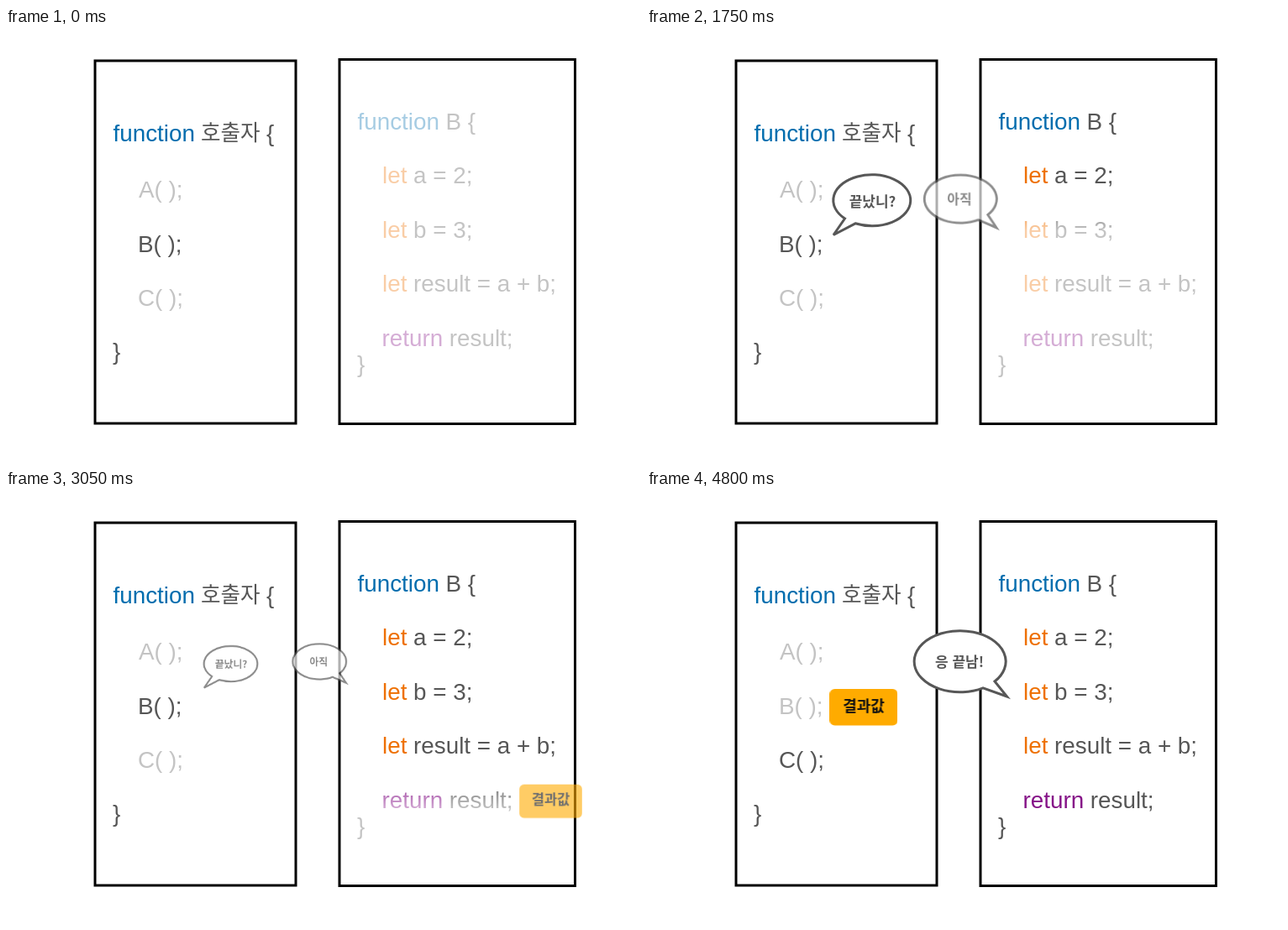
Animation, 756 px wide and 517 px high, one loop 4960 ms. Source, as an HTML page:

```html
<!DOCTYPE html>
<html lang="ko">
<head>
<meta charset="utf-8">
<title>Blocking call</title>
<style>
  html, body { margin: 0; width: 100%; height: 100%; overflow: hidden; background: #fff; }
  svg { position: absolute; left: 0; top: 0; width: 756px; height: 517px; }

  @property --y { syntax: "<length>"; inherits: false; initial-value: 32px; }

  svg, .anim { animation: 4960ms linear infinite; }

  .frame { fill: none; stroke: #000; stroke-width: 3; }
  text { font: 27.8px "Liberation Sans", Arial, sans-serif; fill: #565656; white-space: pre; }
  .ko { font: 25.6px "Noto Sans CJK KR", "Noto Sans CJK", sans-serif; }
  .fn { fill: #006dae; }
  .let { fill: #ee7000; }
  .ret { fill: #861488; }
  .dim { opacity: .35; }

  .bubble path { fill: #fff; stroke: #575757; stroke-width: 3; stroke-linejoin: miter; }
  .bubble text, .value text {
    font: bold 17px "Noto Sans CJK KR", "Noto Sans CJK", sans-serif;
    text-anchor: middle;
  }
  .value text { font-size: 18px; fill: #111; }
  .value rect { fill: #ffab00; }
  .value .ring { fill: none; stroke: #ffab00; stroke-linejoin: round; animation-name: ring; }

  #body {
    -webkit-mask-image: linear-gradient(#000 calc(var(--y) - 22px), rgba(0, 0, 0, .35) calc(var(--y) + 22px));
    mask-image: linear-gradient(#000 calc(var(--y) - 22px), rgba(0, 0, 0, .35) calc(var(--y) + 22px));
    animation-name: wipe;
  }
  #callB { animation-name: dim; }
  #callC { animation-name: light; }
  #ask { transform-origin: 267px 211px; animation-name: ask; }
  #notYet { transform-origin: 373px 206.5px; animation-name: notYet; }
  #done { transform-origin: 373px 206.5px; animation-name: done; }
  #value { transform-origin: 648.5px 370.5px; animation-name: value; }

  @keyframes wipe { from { --y: 31.6px; } to { --y: 563.3px; } }
  @keyframes dim { 0%, 88.1% { opacity: 1; } 93.75%, 100% { opacity: .35; } }
  @keyframes light { 0%, 88.1% { opacity: .35; } 93.75%, 100% { opacity: 1; } }

  /* Bubbles fade in from 80% and leave with a short swell before shrinking. */
  @keyframes ask {
    0%, 8.06%, 26.21%, 44.36%, 62.51%, 66.03%, 85.7%, 100% { opacity: 0; transform: scale(.8); }
    13.1%, 31.25%, 49.4%, 71.07% { opacity: 1; transform: scale(1); }
    21.17%, 39.31%, 57.46%, 80.65% {
      opacity: 1; transform: scale(1);
      animation-timing-function: cubic-bezier(.36, 0, .66, -.56);
    }
    26.2%, 44.35%, 62.5%, 85.69% { opacity: 0; transform: scale(0); }
  }
  @keyframes notYet {
    0%, 13.71%, 26.21%, 31.85%, 44.36%, 50.2%, 62.51%, 100% { opacity: 0; transform: scale(.8); }
    18.75%, 36.9%, 55.24% { opacity: 1; transform: scale(1); }
    21.17%, 39.31%, 57.46% {
      opacity: 1; transform: scale(1);
      animation-timing-function: cubic-bezier(.36, 0, .66, -.56);
    }
    26.2%, 44.35%, 62.5% { opacity: 0; transform: scale(0); }
  }
  @keyframes done {
    0%, 71.57% { opacity: 0; transform: scale(.8); }
    76.6%, 100% { opacity: 1; transform: scale(1); }
  }
  @keyframes value {
    0%, 58.47% { opacity: 0; transform: translate(0, 0) scale(.8); }
    63.5% { opacity: 1; transform: translate(0, 0) scale(1); }
    71.37% {
      opacity: 1; transform: translate(0, 0) scale(1);
      animation-timing-function: cubic-bezier(.37, 0, .63, 1);
    }
    79.44%, 100% { opacity: 1; transform: translate(-390.5px, -112px) scale(1); }
  }
  @keyframes ring {
    0%, 63.5% { stroke-width: 0; opacity: .5; }
    69.5%, 100% { stroke-width: 28px; opacity: 0; }
  }
</style>
</head>
<body>
<svg viewBox="0 0 756 517">
  <rect class="frame" x="106" y="39" width="239" height="432"/>
  <rect class="frame" x="397" y="37.5" width="280.5" height="434"/>
  <text class="fn" x="127.5" y="135">function</text>
  <text class="ko" x="232" y="134">호출자</text>
  <text x="310" y="135">{</text>
  <text class="dim" x="158" y="202">A( );</text>
  <text class="anim" id="callB" x="157" y="266.5">B( );</text>
  <text class="anim" id="callC" x="157" y="331">C( );</text>
  <text x="127" y="395">}</text>
</svg>

<svg id="body" viewBox="0 0 756 517">
  <text x="418.5" y="120.5"><tspan class="fn">function</tspan> B {</text>
  <text x="448" y="185"><tspan class="let">let</tspan> a = 2;</text>
  <text x="448" y="249.5"><tspan class="let">let</tspan> b = 3;</text>
  <text x="448" y="314"><tspan class="let">let</tspan> result = a + b;</text>
  <text x="447.5" y="378.5"><tspan class="ret">return</tspan> result;</text>
  <text x="418" y="410">}</text>
</svg>

<svg viewBox="0 0 756 517">
  <g class="bubble anim" id="ask">
    <path d="M235.5 227 A46 30.5 0 1 1 248 232.8 L222 246.5 Z"/>
    <text x="268.5" y="212.5">끝났니?</text>
  </g>
  <g class="bubble anim" id="notYet">
    <path d="M408 223.5 A46 30.5 0 1 0 396 230 L419 240 Z"/>
    <text x="372" y="210.5">아직</text>
  </g>
  <g class="bubble anim" id="done">
    <path d="M414 228 A54.5 36.5 0 1 0 400 235.8 L428.5 246 Z"/>
    <text x="372" y="210.5">응 끝남!</text>
  </g>
  <g class="value anim" id="value">
    <rect class="ring anim" x="608" y="349" width="81" height="43.5" rx="6"/>
    <rect x="608" y="349" width="81" height="43.5" rx="6"/>
    <text x="648.5" y="375.5">결과값</text>
  </g>
</svg>
</body>
</html>
```
